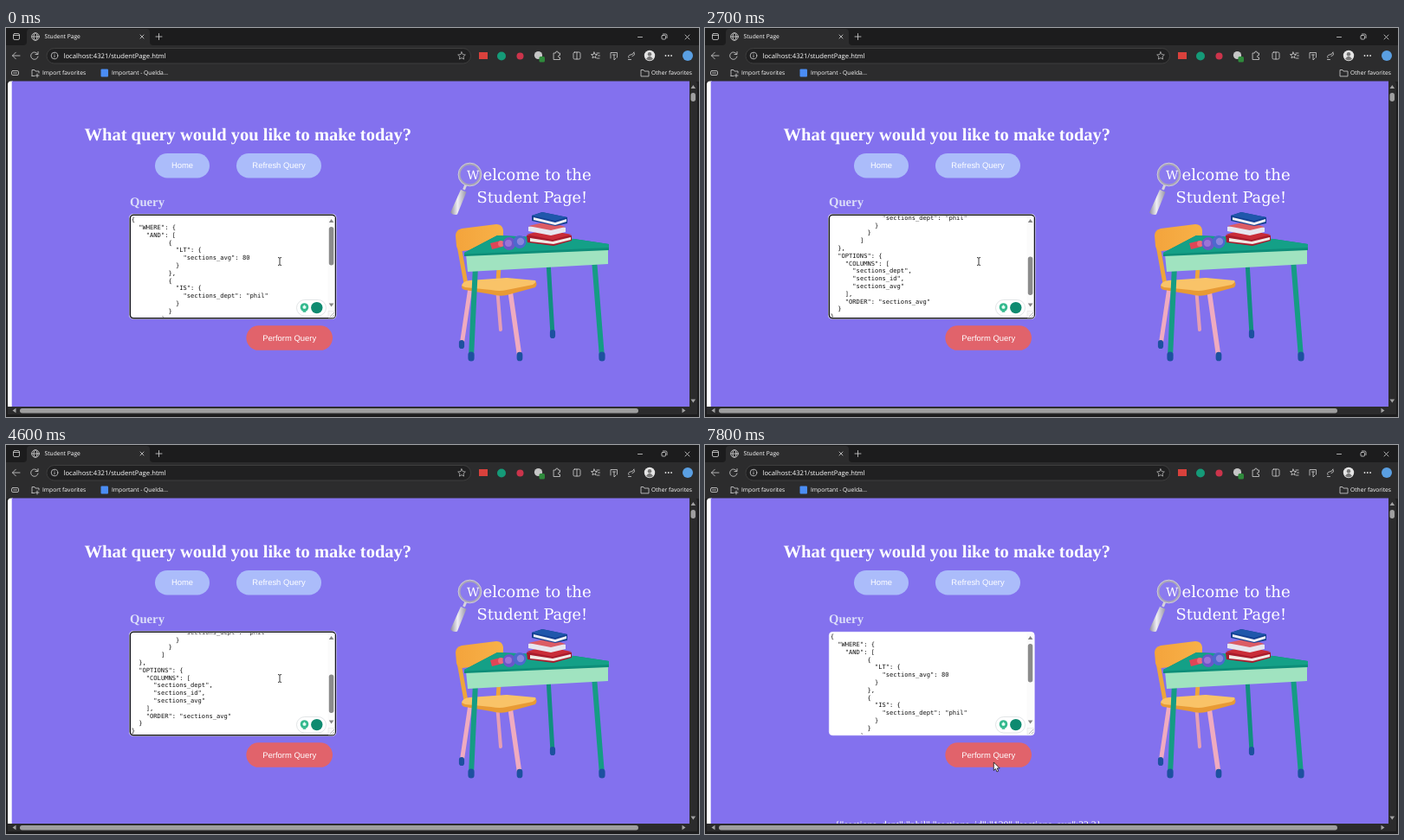
An HTML page that plays this animation: 800 by 450 pixels, repeating every 8 s.

```html
<!DOCTYPE html>
<html lang="en">
<head>
<meta charset="utf-8">
<title>Student Page</title>
<style>
html, body { margin: 0; width: 100%; height: 100%; overflow: hidden; background: #1c1c1d; }
svg { display: block; width: 800px; height: 450px; text-rendering: geometricPrecision; }
.ui { font-family: "Open Sans", "Noto Sans", sans-serif; font-size: 6.7px; fill: #fff; }
.serif { font-family: "Liberation Serif", serif; fill: #fff; }
.btn { font-family: "Liberation Sans", sans-serif; font-size: 9.45px; fill: #fff; text-anchor: middle; }
.slab { font-family: "DejaVu Serif", serif; fill: #fff; }
.code { font-family: "DejaVu Sans Mono", monospace; font-size: 7.1px; fill: #111; }
.line { fill: none; stroke: #cacaca; stroke-width: .85; stroke-linecap: round; stroke-linejoin: round; }
.arrow { fill: #a3a3a3; }
</style>
</head>
<body>
<svg viewBox="0 0 800 450">
  <defs>
    <clipPath id="boxClip"><rect x="144" y="217.500" width="228" height="117"/></clipPath>
    <clipPath id="pageClip"><rect x="7" y="62" width="782" height="376"/></clipPath>
    <linearGradient id="metal" x1="0" x2="1">
      <stop offset="0" stop-color="#8d8b9b"/><stop offset=".45" stop-color="#f0eff5"/><stop offset="1" stop-color="#9895a6"/>
    </linearGradient>
    <linearGradient id="wood" x1="0" x2="1">
      <stop offset="0" stop-color="#f4a43c"/><stop offset="1" stop-color="#f7b148"/>
    </linearGradient>
  </defs>

  <!-- window -->
  <rect width="800" height="450" fill="#1c1c1d"/>
  <path d="M0 62V20H20Q24 20 24 16V5Q24 1 28 1H162Q166 1 166 5V16Q166 20 170 20H800V62Z" fill="#2c2c2d"/>
  <rect x="47" y="23.500" width="489.500" height="17.500" rx="8.700" fill="#202021" stroke="#444445" stroke-width=".8"/>
  <g class="line">
    <rect x="8.500" y="6.500" width="7" height="7" rx="1.500"/><path d="M8.500 8.500H15.500"/>
    <circle cx="34" cy="10" r="4.300"/><ellipse cx="34" cy="10" rx="2" ry="4.300"/><path d="M29.700 10H38.300"/>
    <path d="M155 8l4 4m0-4l-4 4M173 10h7M176.500 6.500v7"/>
    <path d="M729.500 10.500h5M784 8l5 5m0-5l-5 5"/>
    <rect x="757" y="8.500" width="4.500" height="4.500" rx="1"/><path d="M758.500 7h3q1.500 0 1.500 1.500v3"/>
    <path d="M16 32H7.500m3.800-3.800L7.500 32l3.800 3.800"/>
    <path d="M36.500 30A4.200 4.200 0 1 0 37 33M37 27.500V30.500H34"/>
    <circle cx="56" cy="32" r="3.800"/><path d="M56 31.700v2M56 30v.1"/>
    <path d="M526 27.800l1.300 2.800 3 .4-2.200 2.100.5 3-2.600-1.500-2.600 1.500.5-3-2.200-2.100 3-.4z" stroke-width=".7"/>
    <path d="M632.500 29h2q0-2 1.500-2t1.500 2h2v2.500q-2-.3-2 1.300t2 1.300v2.400h-7z"/>
    <rect x="655" y="28" width="8" height="8" rx="1.500"/><path d="M659 28v8"/>
    <path d="M679 28l1 2.400 2.500.2-2 1.700.5 2.500-2-1.300-2 1.300.5-2.500-2-1.700 2.500-.2zM682 29h3M683.500 32h2M682 35h3"/>
    <path d="M698 35v-6.500h7.500V34M700.500 31h3m-1.500 0v6l2-2"/>
    <path d="M719 34.500q-1.500-3 2-3.500t4-3M718.500 36.500h3M725 28.500q2 3-2 4"/>
    <rect x="6.500" y="49.500" width="8" height="5" rx="1.500"/><path d="M8.500 52h4"/>
    <path d="M30 55.500v-7h3l1 1.500h4v2M30 55.500h3M36 53v4M34 55h4"/>
    <path d="M733 55.500v-7h3l1 1.500h5v5.500z"/>
  </g>
  <rect x="546" y="28" width="10" height="8" fill="#d9413c"/>
  <circle cx="572" cy="32.500" r="5" fill="#159a78"/>
  <circle cx="593.500" cy="32.500" r="4" fill="#cb344b"/>
  <circle cx="614.500" cy="31.500" r="4.600" fill="#c6c6c6"/>
  <rect x="615.500" y="33" width="6.500" height="6.500" rx="1.500" fill="#2f8a3c"/>
  <circle cx="743" cy="32" r="6.200" fill="#e5e5e5"/>
  <circle cx="743" cy="30.200" r="2.200" fill="#777"/><path d="M739 35.800q4-6 8 0-4 3.500-8 0" fill="#777"/>
  <g fill="#e0e0e0"><circle cx="761.500" cy="32" r=".9"/><circle cx="764.800" cy="32" r=".9"/><circle cx="768.100" cy="32" r=".9"/></g>
  <circle cx="787" cy="32" r="6" fill="#5a9fe2"/>
  <rect x="109.500" y="47.500" width="8.500" height="9" rx="1" fill="#4b8df4"/>
  <g class="ui">
    <text x="44.500" y="12.400">Student Page</text>
    <text x="66.500" y="34.700" style="font-size:7.7px">localhost:4321/studentPage.html</text>
    <text x="42" y="54.400">Import favorites</text>
    <text x="122" y="54.400">Important - Quelda...</text>
    <text x="745" y="54.400">Other favorites</text>
  </g>

  <!-- page -->
  <path d="M2 438V65.500Q2 61.500 6 61.500H8V438Z" fill="#fff"/>
  <rect x="6.700" y="61.500" width="782.300" height="376.500" fill="#8371ee"/>
  <path d="M789 61.500H794Q798 61.500 798 65.500V447H2V438H789Z" fill="#2b2b2c"/>
  <rect x="790.500" y="75" width="5.500" height="10" rx="2.700" fill="#9f9f9f"/>
  <rect x="16" y="440" width="714" height="5.500" rx="2.700" fill="#9f9f9f"/>
  <path class="arrow" d="M790.500 70l2.800-4 2.800 4zM790.500 429.500l2.800 4 2.800-4zM11.500 439.800v5.400l-4-2.700zM780.500 439.800v5.400l4-2.700z"/>

  <text class="serif" x="90.500" y="130" font-size="20.500" font-weight="700">What query would you like to make today?</text>
  <text class="serif" x="143" y="205.500" font-size="14.700" font-weight="700" style="fill:#dcdef9">Query</text>
  <g id="buttons"></g>

  <!-- query box -->
  <rect id="ring" x="142" y="215" width="239.500" height="122" rx="5" fill="#fff"/>
  <rect id="box" x="143.300" y="216.300" width="237" height="119.500" rx="4" fill="#fff"/>
  <g clip-path="url(#boxClip)"><g id="rows" class="code"></g></g>
  <rect x="371.500" y="218" width="8" height="109" fill="#fbfbfb"/>
  <rect id="thumb" x="372.800" y="230" width="5.500" height="44.500" rx="2.700" fill="#8b8b8b"/>
  <path fill="#858585" d="M372.800 225l2.800-4 2.800 4zM372.800 318.500l2.800 4 2.800-4z"/>
  <path d="M372 327.500h7.500v5.500q0 2-2 2h-5.500z" fill="#f7f7f7" stroke="#e2e2e2" stroke-width=".6"/>
  <path d="M374 334l5-5M377 334l2-2" stroke="#999" stroke-width=".6"/>
  <rect x="335.500" y="314.500" width="34" height="18.500" rx="9.200" fill="#fff" stroke="#dadde0" stroke-width=".8"/>
  <circle cx="344.500" cy="323" r="4.800" fill="#34b98e"/>
  <path d="M344.500 320.300l2.200 2.500-1 2h-2.400l-1-2z" fill="#e6fff5"/>
  <path d="M342.700 328h3.600" stroke="#34b98e" stroke-width="1.600"/>
  <circle cx="358.800" cy="323.600" r="6.700" fill="#0e8a70"/>

  <!-- welcome picture -->
  <path d="M525 187l6.500 2.700L521 215.500q-4 1.800-8-2z" fill="url(#metal)"/>
  <path d="M528.500 187l2.500-6" stroke="#d4d2de" stroke-width="3"/>
  <circle cx="535.500" cy="169.500" r="12.300" fill="#8b7bef" stroke="#aaa7b7" stroke-width="2.600"/>
  <circle cx="535.500" cy="169.500" r="13.400" fill="none" stroke="#dedce8" stroke-width=".7"/>
  <text class="slab" x="532" y="174.800" font-size="14">W</text>
  <text class="slab" x="550.500" y="175.800" font-size="18.200">elcome to the</text>
  <text class="slab" x="543.500" y="201.500" font-size="17.800">Student Page!</text>

  <g id="chairLegs" stroke-linecap="round"></g>
  <g id="chair">
    <path d="M523 252L531 296M571 248L568 292" stroke="#eea53b" stroke-width="4.800" stroke-linecap="round"/>
    <path d="M519 240Q519 234 526 232L566 227Q573 227 574 234L574 247Q574 252 567 253L527 258Q521 258 520 252Z" fill="url(#wood)"/>
    <path d="M526 299Q527 294 535 293L578 289.500L611 293Q614 296 611 300L578 309Q570 311 560 308L530 303Q526 302 526 299Z" fill="#e89a34"/>
    <path d="M526 298Q527 293 535 292L578 289L611 292Q613 294 608 297L578 303Q570 305 560 303L530 300Z" fill="#f9c368"/>
  </g>
  <g id="deskLegs" stroke-linecap="round"></g>
  <g id="desk">
    <path d="M531 262L695 255V273L533 282Z" fill="#a0e3c0"/>
    <path d="M529 260L567 240L656 244L696 250V257L529 264Z" fill="#0d8d78"/>
    <path d="M529 260L567 240L656 244L696 250V254L529 261.500Z" fill="#14a087"/>
  </g>
  <g id="things">
    <path d="M559 249l12-3 2 7-12 3z" fill="#df4657"/>
    <circle cx="571.500" cy="249.500" r="3.500" fill="#f06b78"/>
    <circle cx="581" cy="249.500" r="7.500" fill="#6a57c9"/><circle cx="580" cy="249" r="4" fill="#9b74d7"/>
    <circle cx="593" cy="247.500" r="7.500" fill="#4e68ce"/><circle cx="594" cy="247" r="4.200" fill="#8a86de"/>
    <path d="M601 240L622 235L653 240V246L632 252L602 248Z" fill="#a81b2c"/>
    <path d="M605 243L631 247L652 242V245L632 250L605 247Z" fill="#f2e9e5"/>
    <path d="M601 239L622 233L653 239L631 245Z" fill="#c92c38"/>
    <path d="M603 230L625 226L646 231V236L629 240L603 235Z" fill="#e7e6ef"/>
    <path d="M603 229L625 224L646 230L629 234Z" fill="#db5c64"/>
    <path d="M607 217L619 213L648 219V226L634 229L607 223Z" fill="#123f91"/>
    <path d="M609 219L634 225L647 221V224L634 228L609 222Z" fill="#f1f1f6"/>
    <path d="M607 217L619 213L648 219L634 223Z" fill="#1f57ab"/>
  </g>

  <g clip-path="url(#pageClip)">
    <text id="result" class="serif" x="150" y="442.500" font-size="11.700">{"sections_dept":"phil","sections_id":"120","sections_avg":33.2}</text>
  </g>

  <!-- pointers, drawn around their hot spot -->
  <path id="beam" d="M-2-4.500Q0-4.500 0-3.500Q0-4.500 2-4.500M0-3.500V3.500M-2 4.500Q0 4.500 0 3.500Q0 4.500 2 4.500" fill="none" stroke="#222" stroke-width=".9"/>
  <path id="hand" d="M0 0V9.500L2.200 7.500L3.700 11L5.400 10.200L3.900 6.900H6.900Z" fill="#fff" stroke="#111" stroke-width=".8" stroke-linejoin="round"/>
</svg>
<script>
const LOOP = 8000, STEP = 100;
const ROW = 8.8, COL = 4.275;
const $ = id => document.getElementById(id);

function add(parent, tag, attrs, text = "") {
  const el = document.createElementNS("http://www.w3.org/2000/svg", tag);
  for (const key in attrs) el.setAttribute(key, attrs[key]);
  el.textContent = text;
  parent.append(el);
}

// [label, left, top, width, colour]
for (const [label, x, y, w, fill] of [
  ["Home", 172, 145, 63, "#abbcfa"],
  ["Refresh Query", 266, 145, 98, "#abbcfa"],
  ["Perform Query", 277.4, 344.3, 99.6, "#e1636b"]
]) {
  add($("buttons"), "rect", { x, y, width: w, height: 28.5, rx: 14.2, fill });
  add($("buttons"), "text", { x: x + w / 2, y: y + 17.2, class: "btn" }, label);
}

// [group, top x, top y, foot x, foot y, colour, width]
for (const [group, x1, y1, x2, y2, stroke, w] of [
  ["chairLegs", 567, 300, 571, 349, "#e59fb4", 4],
  ["chairLegs", 536, 300, 526, 367, "#efabc0", 5],
  ["chairLegs", 582, 304, 593, 381, "#efabc0", 5.5],
  ["deskLegs", 626, 270, 631, 355, "#128f7f", 5],
  ["deskLegs", 542, 275, 537, 381, "#159c84", 6],
  ["deskLegs", 679, 268, 688, 381, "#159c84", 6]
]) {
  add($(group), "path", { d: `M${x1} ${y1}L${x2} ${y2}`, stroke, "stroke-width": w });
  if (y2 > 350) add($(group), "path", { d: `M${x2} ${y2 - 3}V${y2 + 1}`, stroke: "#1d519f", "stroke-width": w + 1.2 });
}

// leading digits give the indent
const query = `0 {
2 "WHERE": {
4 "AND": [
10 {
12 "LT": {
14 "sections_avg": 80
12 }
10 },
10 {
12 "IS": {
14 "sections_dept": "phil"
12 }
10 }
8 ]
2 },
2 "OPTIONS": {
4 "COLUMNS": [
6 "sections_dept",
6 "sections_id",
6 "sections_avg"
4 ],
4 "ORDER": "sections_avg"
2 }
0 }`;
query.split("\n").forEach((row, i) => {
  const [, indent, text] = row.match(/^(\d+) (.*)$/);
  add($("rows"), "text", { x: 144.7 + indent * COL, y: 224.2 + i * ROW }, text);
});

const scroll = [[0, 0], [1200, 0], [2000, 57.5], [2700, 90.5], [3100, 102.5], [4500, 102.5], [5500, 12], [5800, 0]];
const BLUR = 7200, RESULT = 7400;

function track(steps, t) {
  const i = steps.findIndex(s => s[0] > t);
  if (i < 0) return steps[steps.length - 1][1];
  const [t0, v0] = steps[i - 1], [t1, v1] = steps[i];
  return v0 + (v1 - v0) * (t - t0) / (t1 - t0);
}

const show = (id, on) => $(id).setAttribute("visibility", on ? "visible" : "hidden");
const move = (id, x, y) => $(id).setAttribute("transform", `translate(${x} ${y})`);

function draw(t) {
  const top = track(scroll, t);
  move("rows", 0, -top);
  move("thumb", 0, top * 0.38);

  const p = track([[0, 0], [6100, 0], [7000, 1]], t);
  const ease = p * p * (3 - 2 * p);
  const x = 316 + 17.3 * ease, y = 270 + 97 * ease;
  move("beam", x, y);
  move("hand", x, y);
  show("beam", y < 336);
  show("hand", y >= 336);

  const focus = t < BLUR;
  show("ring", focus);
  $("box").setAttribute("stroke", focus ? "#161620" : "#fff");
  $("box").setAttribute("stroke-width", focus ? 1.6 : 0.5);
  show("result", t >= RESULT);
}

function frame() {
  draw(Math.floor(performance.now() % LOOP / STEP) * STEP);
  requestAnimationFrame(frame);
}
frame();
</script>
</body>
</html>
```
